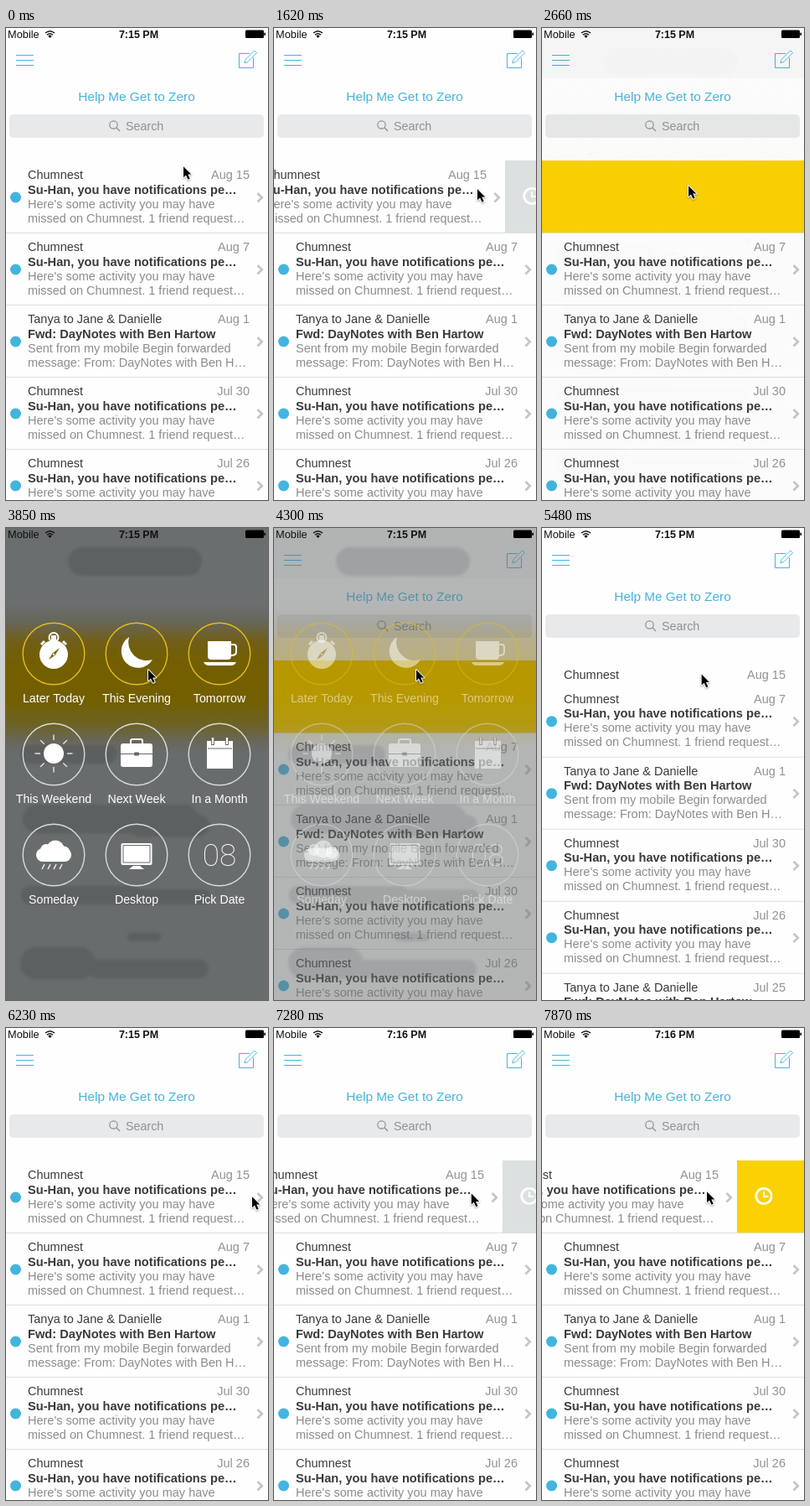
Write an HTML page with a canvas that moves like this. It is 313 px wide and 563 px high and loops after 8000 ms.

```html
<!DOCTYPE html>
<html lang="en">
<head>
<meta charset="utf-8">
<title>Mail swipe</title>
<style>
  html, body { margin: 0; width: 100%; height: 100%; overflow: hidden; background: #fefefe; }
  canvas { display: block; width: 313px; height: 563px; }
</style>
</head>
<body>
<canvas id="stage"></canvas>
<script>
const W = 313, H = 563, LIST_TOP = 158, ROW = 86, LOOP = 8000;
const BLUE = '#42b4de', YELLOW = '#fad102', PAPER = '#fefefe', INK = '#3a3a3a';
const SANS = '"Liberation Sans", Arial, sans-serif';
const canvas = document.getElementById('stage');
const ctx = canvas.getContext('2d');
const dpr = window.devicePixelRatio || 1;
canvas.width = W * dpr;
canvas.height = H * dpr;
ctx.scale(dpr, dpr);

const notice = {
  from: 'Chumnest', title: 'Su-Han, you have notifications pe…',
  lines: ['Here\'s some activity you may have', 'missed on Chumnest. 1 friend request…']
};
const forward = {
  from: 'Tanya to Jane & Danielle', title: 'Fwd: DayNotes with Ben Hartow',
  lines: ['Sent from my mobile Begin forwarded', 'message: From: DayNotes with Ben H…']
};
const mails = [
  [notice, 'Aug 15'], [notice, 'Aug 7'], [forward, 'Aug 1'],
  [notice, 'Jul 30'], [notice, 'Jul 26'], [forward, 'Jul 25']
];

// Tracks are [tick, value...] and run linearly between keys.
const cursorTrack = [
  [0, 211, 164], [6, 293, 200], [8, 293, 200], [11, 242, 191], [14, 174, 187], [24, 174, 187],
  [26, 169, 168], [36, 169, 168], [42, 293, 200], [43, 293, 200], [53, 196, 194]
];
const swipeTrack = [
  [8, 0], [11, -37], [14, -104], [16, -104], [18, -W], [36, -W], [37, 0], [45, 0], [53, -80]
];
const heightTrack = [[29, ROW], [30, 60], [31, 13.6], [32, 0], [36, 0], [39, ROW]];
const menuTrack = [[17, 0], [18, 0.02], [19, 0.55], [20, 1], [28, 1], [29, 0.5], [30, 0.06], [31, 0]];

function sample(track, tick) {
  const next = track.findIndex(key => key[0] >= tick);
  if (next < 0) return track[track.length - 1].slice(1);
  if (next === 0) return track[0].slice(1);
  const a = track[next - 1], b = track[next];
  const k = (tick - a[0]) / (b[0] - a[0]);
  return a.slice(1).map((v, i) => v + (b[i + 1] - v) * k);
}

function text(str, x, y, size, color, align = 'left', weight = '', family = SANS) {
  ctx.font = `${weight} ${size}px ${family}`;
  ctx.textAlign = align;
  ctx.fillStyle = color;
  ctx.fillText(str, x, y);
}

function rect(x, y, w, h, color, r = 0) {
  ctx.fillStyle = color;
  ctx.beginPath();
  ctx.roundRect(x, y, w, h, r);
  ctx.fill();
}

function disc(x, y, r, color) {
  ctx.fillStyle = color;
  ctx.beginPath();
  ctx.arc(x, y, r, 0, Math.PI * 2);
  ctx.fill();
}

function stroke(d, color, width = 1) {
  ctx.strokeStyle = color;
  ctx.lineWidth = width;
  ctx.stroke(new Path2D(d));
}

function fill(d, color) {
  ctx.fillStyle = color;
  ctx.fill(new Path2D(d));
}

function ring(x, y, r, color, width) {
  ctx.strokeStyle = color;
  ctx.lineWidth = width;
  ctx.beginPath();
  ctx.arc(x, y, r, 0, Math.PI * 2);
  ctx.stroke();
}

function at(x, y, draw) {
  ctx.save();
  ctx.translate(x, y);
  draw();
  ctx.restore();
}

function drawHeader() {
  stroke('M12 32.5H33M12 38.5H33M12 44.5H33', BLUE);
  stroke('M291 30.5H278.5V47.5H295.5V35.5', BLUE);
  stroke('M284.8 41.8l1.2-4.2L296.8 26.9l2.7 2.7L289 40.4Z', BLUE, 0.9);
  text('Help Me Get to Zero', 156, 86.5, 15.4, BLUE, 'center');
  rect(4, 103, 304, 28, '#e8e9ea', 5);
  ring(128.5, 115.5, 4.7, '#8e9093', 1.2);
  stroke('M132 119l4 4', '#8e9093', 1.3);
  text('Search', 143, 122, 14.3, '#8e9093');
}

function drawStatus(clock) {
  text('Mobile', 2, 12, 12.8, '#111');
  stroke('M47 6q5.5-4.6 11 0M49 8.2q3.5-3 7 0', '#111', 1.5);
  fill('M50.3 9.4q2.2-1.6 4.4 0L52.5 12Z', '#111');
  text(clock, 158.5, 12, 12.5, '#111', 'center', 'bold');
  rect(286, 2.5, 22, 9.5, '#000', 1.5);
  rect(308.4, 5.5, 1.6, 3.5, '#000', 1);
}

function drawRow([mail, date], y, line) {
  at(0, y, () => {
    rect(0, 0, W, ROW, PAPER);
    if (line) rect(0, 0, W, 1, '#dfdfe0');
    disc(11.5, 44, 6.5, BLUE);
    text(mail.from, 26, 22, 14.5, INK);
    text(date, 291, 22, 14.5, '#929292', 'right');
    text(mail.title, 26, 39.5, 14.65, INK, 'left', 'bold');
    mail.lines.forEach((str, i) => text(str, 26, 56.7 + 17 * i, 14.5, '#8c8c8c'));
    stroke('M300.5 39l5.2 5.2-5.2 5.2', '#c5c6c8', 2.8);
  });
}

function drawSwipeAction(swipe) {
  const armed = swipe < -58;
  rect(0, LIST_TOP, W, ROW, armed ? YELLOW : '#dce0e1');
  if (swipe <= -W) return;
  const x = W + swipe + 32;
  ctx.globalAlpha = Math.min(1, -swipe / 40);
  ring(x, 200.5, 9.2, '#fff', 2.8);
  stroke(`M${x} 195v6h5.5`, '#fff', 2);
  ctx.globalAlpha = 1;
}

function drawList(swipe, height) {
  ctx.save();
  ctx.beginPath();
  ctx.rect(0, LIST_TOP, W, height);
  ctx.clip();
  if (swipe < 0) drawSwipeAction(swipe);
  at(swipe, 0, () => drawRow(mails[0], LIST_TOP, false));
  ctx.restore();
  mails.slice(1).forEach((mail, i) =>
    drawRow(mail, LIST_TOP + height + ROW * i, i > 0 || height === ROW));
}

const WHITE = '#fff', SHADE = '#65696a', OCHRE = '#7a6400';
const choices = [
  ['Later Today', () => {
    disc(0, 1, 17, WHITE);
    rect(-3, -22, 6, 7, WHITE);
    ring(0, -19.5, 5.5, WHITE, 2);
    stroke('M11-15l4 4M-11-15l-4 4', WHITE, 3);
    fill('M-6 7L-1.5-.5 7-7 1.5 2Z', OCHRE);
    disc(0, 0.7, 1.2, WHITE);
  }],
  ['This Evening', () => fill('M-9-20A20 20 0 1 0 19 7A22 22 0 0 1-9-20Z', WHITE)],
  ['Tomorrow', () => {
    fill('M-14-15H14V3q0 4-4 4H-10q-4 0-4-4Z', WHITE);
    stroke('M14-11h3q3 0 3 3v6q0 4-6 4', WHITE, 2);
    fill('M-19 10H20q-2 4-6 4H-13q-4 0-6-4Z', WHITE);
  }],
  ['This Weekend', () => {
    disc(0, -1, 12, WHITE);
    for (let i = 0; i < 8; i++) at(0, -1, () => {
      ctx.rotate(i * Math.PI / 4);
      stroke('M16 0H22.5', WHITE, 1.2);
    });
  }],
  ['Next Week', () => {
    rect(-19, -13, 38, 28, WHITE, 3);
    stroke('M-7-13v-3q0-2 2-2H5q2 0 2 2v3', WHITE, 2);
    stroke('M-19-.5H19', SHADE, 1);
    rect(-3, -2.5, 6, 4, SHADE, 1);
  }],
  ['In a Month', () => {
    rect(-15, -16, 31, 33, WHITE);
    stroke('M-14-7H15', SHADE, 1);
    stroke('M-8-20v9M9-20v9', SHADE, 4);
    stroke('M-8-20v8M9-20v8', WHITE, 2.2);
  }],
  ['Someday', () => {
    rect(-21, -8, 42, 16, WHITE, 8);
    disc(-9, -6, 7, WHITE);
    disc(2, -7, 10.5, WHITE);
    disc(12, -3, 7.5, WHITE);
    for (let x = -11; x < 12; x += 7) stroke(`M${x} 11l-3 6`, WHITE, 1.3);
  }],
  ['Desktop', () => {
    rect(-18.5, -14, 37, 26, WHITE, 2);
    stroke('M-16-11.5H16V9H-16Z', SHADE, 1);
    fill('M-4 13H4L9 17H-9Z', WHITE);
  }],
  ['Pick Date', () => text('08', 0, 13, 37, WHITE, 'center', 100, 'Roboto, Lato, sans-serif')]
];

const blots = [
  [154, 40, 80, 17], [75, 270, 58, 11], [125, 347, 105, 17], [195, 355, 48, 13],
  [90, 438, 72, 11], [190, 440, 55, 9], [165, 488, 20, 5], [62, 519, 45, 19], [170, 526, 72, 11]
];

function drawBackdrop() {
  const fade = ctx.createLinearGradient(0, 90, 0, 270);
  [[0, '#6a6e6f'], [0.12, '#67665a'], [0.25, '#705f18'], [0.4, '#735f00'], [0.64, '#735f00'],
    [0.8, '#6d6224'], [0.92, '#68685d'], [1, '#686c6d']].forEach(stop => fade.addColorStop(...stop));
  rect(0, 0, W, H, fade);
  ctx.save();
  ctx.filter = `blur(${1.5 * dpr}px)`;
  ctx.fillStyle = 'rgba(66,70,72,.3)';
  ctx.beginPath();
  for (const [x, y, rx, ry] of blots) ctx.roundRect(x - rx, y - ry, rx * 2, ry * 2, ry);
  ctx.fill();
  ctx.restore();
}

function drawMenu(alpha) {
  if (!alpha) return;
  if (alpha < 1) rect(0, 0, W, 60, 'rgba(0,0,0,.025)');
  ctx.save();
  ctx.globalAlpha = alpha;
  drawBackdrop();
  choices.forEach(([label, icon], i) => {
    const row = Math.floor(i / 3);
    at(57 + 99 * (i % 3), 150 + 120 * row, () => {
      ring(0, 0, 36.8, row ? '#d9dbdb' : '#e3bd1c', 1.4);
      icon();
      text(label, 0, 58, 14.2, WHITE, 'center');
    });
  });
  ctx.restore();
}

function drawCursor(x, y) {
  at(x, y, () => {
    const arrow = 'M1 1.2V14.2l3-2.8 2.5 5.4 2.2-1-2.4-5.2h4Z';
    ctx.lineJoin = 'round';
    ctx.shadowColor = 'rgba(0,0,0,.35)';
    ctx.shadowBlur = 2 * dpr;
    ctx.shadowOffsetY = dpr;
    stroke(arrow, WHITE, 2);
    ctx.shadowColor = 'transparent';
    fill(arrow, '#000');
  });
}

function render(now) {
  const time = now % LOOP;
  const tick = Math.floor(time / 148.5 + 0.16);
  rect(0, 0, W, H, PAPER);
  drawHeader();
  drawList(sample(swipeTrack, tick)[0], sample(heightTrack, tick)[0]);
  drawMenu(sample(menuTrack, tick)[0]);
  drawStatus(tick < 43 ? '7:15 PM' : '7:16 PM');
  drawCursor(...sample(cursorTrack, tick));
  requestAnimationFrame(render);
}
requestAnimationFrame(render);
</script>
</body>
</html>
```
